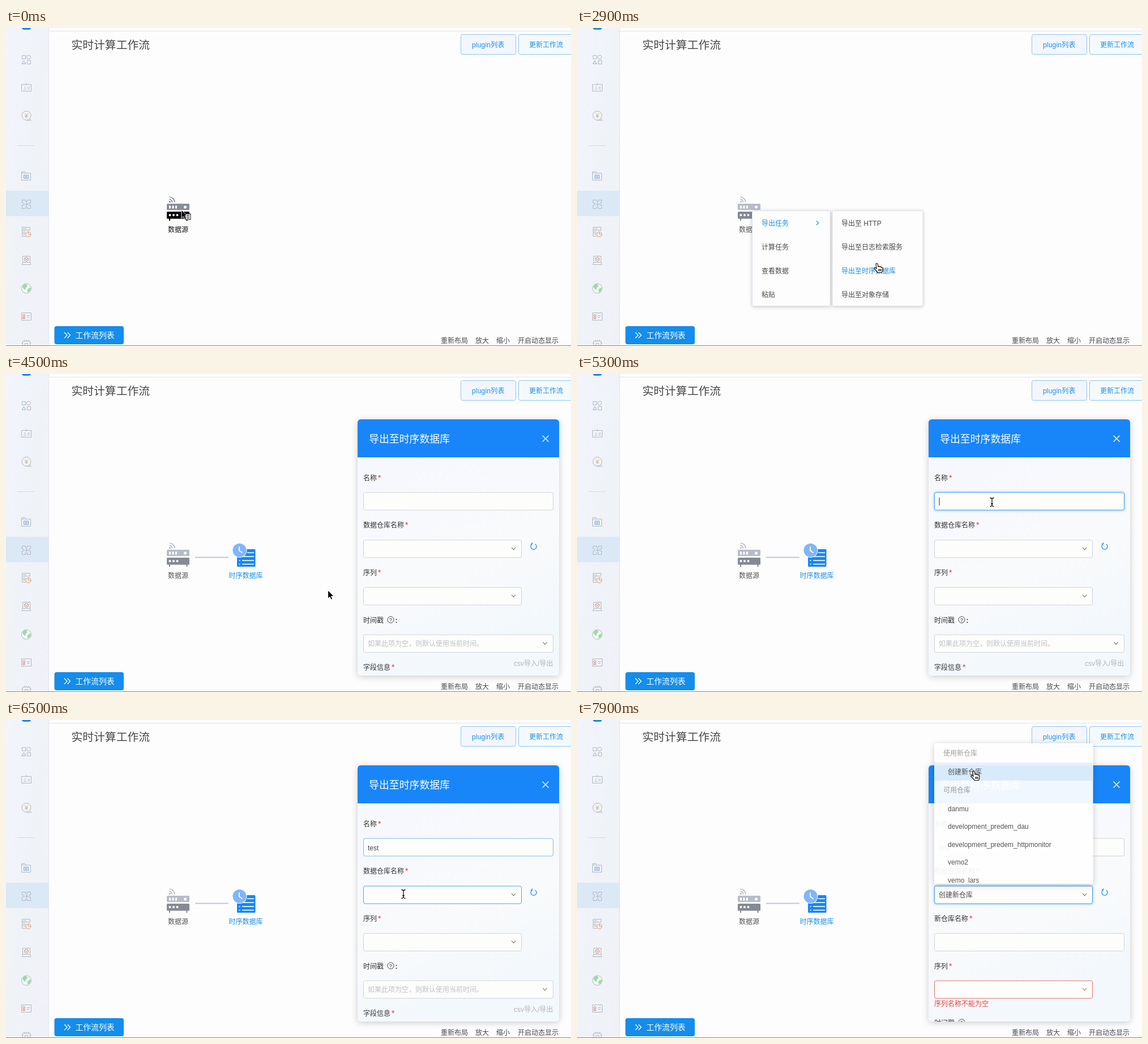
An HTML page that plays this animation: 998x561 px, repeating every 8000 ms.

```html
<!DOCTYPE html>
<html lang="zh">
<head>
<meta charset="utf-8">
<style>
html, body { margin: 0; width: 100%; height: 100%; overflow: hidden; background: #fdfdfe }
svg { display: block; font: 12px "Liberation Sans", "Noto Sans CJK SC", sans-serif; fill: #4a4a4c }
.line { fill: none; stroke: #b4b8c0; stroke-width: 1 }
.node { --top: #b7bcc8; --base: #858a95; --label: #555 }
.node.hover { --top: #888d98; --base: #000; --label: #111 }
.box { fill: #fdfdfc; stroke: #d0d3d8 }
.box.red { stroke: #e8706a }
.box.hover { stroke: #4ba5ee }
.box.soft { stroke: #7fbcf0 }
.box.focus { stroke: #40a0f0; filter: drop-shadow(0 0 2px #1890ff88) }
.menu { fill: #fdfdfe; stroke: #dfe1e8; filter: drop-shadow(0 1px 3px #0003) }
</style>
</head>
<body>
<svg id="stage" width="998" height="561" viewBox="0 0 998 561"></svg>
<script>
const BLUE = '#1886f8', LINK = '#1b8fe8';

// Text placed by its left edge and vertical centre.
const text = (x, cy, s, { size = 12, attr = '' } = {}) =>
  `<text x="${x}" y="${cy + size * .38}" font-size="${size}" ${attr}>${s}</text>`;
const label = (cy, s, star = true) =>
  text(631, cy, s + (star ? '<tspan fill="#e23c39" dx="2" font-size="14">*</tspan>' : ''),
    { attr: 'fill="#333" font-weight="500"' });
const box = (y, w, id = '', cls = '') =>
  `<rect ${id && `id="${id}"`} class="box ${cls}" x="631.5" y="${y + .5}" width="${w}" height="31" rx="3"/>`;
const stroke = (d, color, width = 1) =>
  `<path d="${d}" fill="none" stroke="${color}" stroke-width="${width}"/>`;
const arrow = (x, y, color = '#666') => stroke(`M${x - 3.5} ${y - 2}l3.5 4 3.5-4`, color, 1.1);
const rect = (x, y, w, h, fill, extra = '') =>
  `<rect x="${x}" y="${y}" width="${w}" height="${h}" fill="${fill}" ${extra}/>`;
const dot = (x, y, r, fill) => `<circle cx="${x}" cy="${y}" r="${r}" fill="${fill}"/>`;
const group = (id, body, attr = '') => `<g id="${id}" ${attr}>${body}</g>`;
const timestamp = cy => label(cy, '时间戳', false) +
  `<circle cx="679.5" cy="${cy - .5}" r="5.6" fill="none" stroke="#444"/>` +
  text(676.7, cy - .3, '?', { size: 9.5, attr: 'fill="#333"' }) +
  text(687.5, cy, ':', { attr: 'fill="#333" font-weight="700"' });

const sidebar = rect(0, 0, 75, 561, 'url(#side)') + rect(75, 0, 1, 561, '#e4e6ee') +
  rect(0, 287, 75, 45, '#dbe9f7') + rect(28, -10, 16, 13, BLUE, 'rx="4"') +
  rect(20, 207, 31, 1, '#d6dae2') + `<g class="line">
  <path d="M28.5 48.5h6v6h-6zM37.500 57.500h6v6h-6zM36.500 51.500a3.500 3.500 0 1 0 7 0a3.500 3.500 0 1 0-7 0"/>
  <path d="M31.500 57.500l3.500 5.500h-7z" stroke="#83b5e6"/>
  <path d="M27.500 99.500h17v12h-17zM36 97v4M31 108h5M33.500 103v3M38 104.500h4M38 107.500h4"/>
  <path d="M28 154.500a8 8 0 1 1 16 0a8 8 0 1 1-16 0M36 163h8.500l-2.500-3"/>
  <path d="M33 150.500l3 3.500 3-3.500M36 154v5M33.500 154.500h5M33.500 156.500h5" stroke="#d9b37c"/>
  <path d="M27.500 268.500v-15h6l2 2.500h8v12.500zM27.500 256h8"/>
  <path d="M31.500 259.500h8v6h-8zM33 261.500h5M33 263.500h5" stroke="#7fa9d8"/>
  <path d="M28.500 303.500h6q-1 3 1.500 3t1.500-3h6v5q-3-1-3 2t3 2v6h-6q1-3-1.500-3t-1.500 3h-6v-6q3 1 3-2t-3-2zM33 311h7M36.500 307.500v7"/>
  <path d="M28.500 351.500h14v5h-14zM28.500 356.500v5h7M28.500 361.500v6h7M30 354h6M30 359h4M30 364h4"/>
  <path d="M35 364a4.500 4.500 0 1 0 9 0a4.500 4.500 0 1 0-9 0M39.500 360v4h4" stroke="#e19a72"/>
  <path d="M29.500 402.500h13v11h-13zM28 417.500h16l-1.500-4h-13z"/>
  <path d="M32.500 408a3.500 3.500 0 1 0 7 0a3.500 3.500 0 1 0-7 0M33 406l3 3 3-3" stroke="#de8b75"/>
  <circle cx="36" cy="459.500" r="8.500" fill="#f4f7f7"/>
  <path d="M29 456q3-5 7-4l2 3-3 3-1 4-3-2zM38 461l4-3 2 1-2 6-4 1z" fill="#9bdba8" stroke="none"/>
  <path d="M27.500 502.500h17v13h-17zM37 507.500h5M37 510.500h4"/>
  <path d="M29.500 507.500a2 2 0 1 0 4 0a2 2 0 1 0-4 0M30 510v3l1.500-1 1.500 1v-3" stroke="#d9776c"/>
  <path d="M29.500 552.500h13v12h-13zM33.500 556.500h5v6h-5zM32.500 550v2M36 550v2M39.500 550v2M27 556h2M43 556h2"/></g>`;

const page = rect(76, 5, 922, 1, '#e4e4ea') +
  text(115.500, 29, '实时计算工作流', { size: 19.8, attr: 'fill="#484848"' }) +
  rect(803.5, 11.5, 97, 35, '#f4f6fd', 'rx="3" stroke="#8fc4f6"') +
  rect(905.5, 11.5, 110, 35, '#f4fafc', 'rx="3" stroke="#8fc4f6"') +
  text(823, 29, 'plugin列表', { attr: `fill="${LINK}" font-weight="500" letter-spacing=".2"` }) +
  text(924, 29, '更新工作流', { attr: `fill="${LINK}" font-weight="500"` }) +
  rect(85.5, 526, 122.500, 32, '#148dec', 'rx="4"') +
  stroke('M103 537l5 5-5 5M108.500 537l5 5-5 5', '#fff', 1.3) +
  text(122.500, 542, '工作流列表', { size: 13.8, attr: 'fill="#fff" font-weight="500"' }) +
  [[768, '重新布局'], [829, '放大'], [866, '缩小'], [904, '开启动态显示']]
    .map(([x, s]) => text(x, 551, s)).join('') +
  rect(0, 560, 998, 1, '#85878c');

const source = stroke('M288.500 302a6 6 0 0 1 5 5.500M288.500 298a10 10 0 0 1 9.500 9.500', 'var(--top)', 1.7) +
  dot(289.500, 306.500, 1.6, 'var(--top)') +
  rect(284, 310, 40, 11, 'var(--top)', 'rx="1.5"') + rect(284, 324, 40, 12.500, 'var(--base)', 'rx="1.5"') +
  rect(288, 336, 2, 4, 'var(--base)') + rect(318.500, 336, 2, 4, 'var(--base)') +
  [288, 293.500, 299].map(x => rect(x, 313.500, 3, 5, '#fff')).join('') + dot(316.500, 316, 2.5, '#fff') +
  [289.500, 296, 302.500].map(x => dot(x, 330, 2, '#fff')).join('') +
  text(304, 355, '数据源', { attr: 'text-anchor="middle" fill="var(--label)"' });

const database = rect(408, 309, 32.500, 31, BLUE, 'rx="1.5"') +
  rect(426, 314.500, 12, 1.6, '#fff') +
  [322, 329, 335.500].map(y => dot(412.500, y, 1.1, '#fff') + rect(417, y - .8, 21, 1.6, '#fff')).join('') +
  dot(412.500, 311, 13, '#fdfdfe') + dot(412.500, 311, 12, '#7fb6fb') +
  stroke('M412 304.500v7l5.500 4', '#fff', 1.8) +
  text(423.500, 355, '时序数据库', { attr: `text-anchor="middle" fill="${LINK}"` });

const ROWS = [344, 386, 428, 470];
const menu = '<rect class="menu" x="309.500" y="322.500" width="138" height="168" rx="2"/>' +
  ['导出任务', '计算任务', '查看数据', '粘贴']
    .map((s, i) => text(326, ROWS[i], s, { attr: i ? '' : 'id="first"' })).join('') +
  stroke('M423 340.500l3.500 3.500-3.500 3.500', LINK, 1.1);
const submenu = '<rect class="menu" x="451" y="322.500" width="160" height="168" rx="2"/>' +
  ['HTTP', '日志检索服务', '时序数据库', '对象存储'].map((s, i) =>
    text(467, ROWS[i], '导出至' + (i ? '' : ' ') + s, { attr: 'class="target"' })).join('');

const form = label(183, '名称') + box(208.5, 335, 'name') + text(639, 225, '', { attr: 'id="typed"' }) +
  rect(640, 218, 1, 14, '#222', 'id="caret"') +
  label(266.5, '数据仓库名称') + box(292.5, 279, 'repo') + arrow(896.5, 308) +
  group('picked', text(639, 308.5, '创建新仓库')) +
  stroke('M934.500 300a5 5 0 1 1-5 0M929.500 300v-2.800M929.500 300h-2.800', LINK, 1.3) +
  group('fieldsA', label(350, '序列') + box(376, 279) + arrow(896.5, 391.5) +
    timestamp(434) + box(459.5, 335) + arrow(952, 475) +
    text(639, 475.5, '如果此项为空，则默认使用当前时间。', { attr: 'fill="#bfc1c4"' }) +
    label(517.500, '字段信息') + text(897, 510.5, 'csv导入/导出', { attr: 'fill="#b3b4b8"' })) +
  group('fieldsB', label(350, '新仓库名称') + box(376, 335) +
    label(434, '序列') + box(459.5, 279, '', 'red') + arrow(896.5, 475, '#e05a55') +
    text(631, 500.5, '序列名称不能为空', { attr: 'fill="#e0453c"' }) + timestamp(534));

const panel = rect(621, 80, 356, 452, 'url(#body)', 'rx="6" filter="url(#shade)"') +
  `<path d="M621 147V86q0-6 6-6h344q6 0 6 6v61z" fill="${BLUE}"/>` +
  text(641, 114.500, '导出至时序数据库', { size: 17.9, attr: 'fill="#fff" font-weight="500"' }) +
  stroke('M947.500 108.500l11 11M958.500 108.500l-11 11', '#fff', 1.4) +
  `<g clip-path="url(#clip)">${group('form', form)}</g>` +
  group('loading', group('dots', [0, 1, 2, 3].map(i =>
      `<circle cx="7.4" r="3.4" fill="#65adf4" opacity="${[.95, .6, .65, .6][i]}" transform="rotate(${i * 90})"/>`).join('')) +
    text(769, 341, '数据加载中', { attr: `fill="${LINK}"` }));

const dropdown = rect(631, 41, 280.500, 248, '#fff', 'rx="3" filter="url(#shade)"') +
  rect(631, 75, 280.500, 32, '#e6f2fc') + '<g clip-path="url(#list)">' +
  text(647, 58.500, '使用新仓库', { attr: 'fill="#999"' }) + text(655, 91, '创建新仓库') +
  text(647, 123.500, '可用仓库', { attr: 'fill="#999"' }) +
  ['danmu', 'development_predem_dau', 'development_predem_httpmonitor', 'vemo2', 'vemo_lars']
    .map((s, i) => text(655, 156 + i * 31.6, s)).join('') + '</g>';

const pointer = 'M0 0V14.500L3.300 11.500 5.500 16.500 8 15.400 5.800 10.500H10.500Z';
const beam = 'M-3.500-7.500Q0-7.500 0-5V5Q0 7.500-3.500 7.500M3.500-7.500Q0-7.500 0-5V5Q0 7.500 3.500 7.500M-2 3H2';
const cursors = group('arrow', `<path d="${pointer}" stroke="#fff"/>` +
    group('badge', rect(7, 7, 9, 10, '#fff', 'stroke="#111"') +
      stroke('M9 9.500h5M9 12h5M9 14.500h5', '#111')), 'fill="#000"') +
  group('hand', `<path d="M-2 1.500C-2-.500 1-.500 1.200 1.500L2 6C3 5 4.700 5.300 4.900 6.500C6 5.700 7.300 6.200 7.400 7.300
    C8.800 6.800 9.800 7.500 9.800 9V12C9.800 13.500 9 14.500 8.500 16.500H1C0 14-3 11.500-5 9.500C-5.800 8.300-4 7-2.500 8.200L-1 9.500Z
    M3 10v4M5 10v4M7 10v4" fill="#fff" stroke="#111" stroke-width="1.200"/>`) +
  group('beam', stroke(beam, '#fff', 3) + stroke(beam, '#111', 1.3));

stage.innerHTML = `<defs>
  <linearGradient id="side" x2="1" y2="1"><stop stop-color="#f3f4fd"/><stop offset=".5" stop-color="#eff3f7"/><stop offset="1" stop-color="#f0f1f8"/></linearGradient>
  <linearGradient id="body" x2=".3" y2="1"><stop stop-color="#f6f7ff"/><stop offset=".65" stop-color="#f9fafb"/><stop offset="1" stop-color="#f3f8fc"/></linearGradient>
  <filter id="shade" x="-20%" y="-20%" width="140%" height="140%"><feDropShadow dx="0" dy="2" stdDeviation="6" flood-opacity=".2"/></filter>
  <clipPath id="clip"><rect x="621" y="147" width="356" height="385"/></clipPath>
  <clipPath id="list"><rect x="631" y="41" width="281" height="247.500"/></clipPath></defs>` +
  sidebar + page + '<path id="edge" stroke="#c3c8d1" stroke-width="2"/>' +
  group('source', source, 'class="node"') + group('database', database) +
  group('menu', menu) + group('submenu', submenu) + group('panel', panel) +
  group('dropdown', dropdown) + group('cursor', cursors);

const $ = id => document.getElementById(id);
const clamp = v => Math.min(1, Math.max(0, v));
const ease = v => v * v * (3 - 2 * v);
const ramp = (t, from, to) => ease(clamp((t - from) / (to - from)));
const show = (id, on) => {
  $(id).style.opacity = +on;
  $(id).style.visibility = on ? 'visible' : 'hidden';
};

// Pointer stops: time, x, y.
const STOPS = [[0, 310, 321], [800, 310, 321], [1300, 340, 345], [1600, 340, 345], [2200, 480, 350],
  [2800, 530, 415], [3200, 530, 415], [3400, 528, 420], [4300, 528, 420], [5000, 733, 226],
  [6050, 733, 226], [6400, 702, 307], [6900, 702, 307], [7500, 701, 90], [8000, 701, 90]];

function pointerAt(t) {
  const i = STOPS.findIndex(s => s[0] > t);
  const [t0, x0, y0] = STOPS[i - 1], [t1, x1, y1] = STOPS[i], k = ramp(t, t0, t1);
  return [x0 + (x1 - x0) * k, y0 + (y1 - y0) * k];
}

function draw(t) {
  const [x, y] = pointerAt(t), menuOpen = t >= 700 && t < 3300;
  const busy = t < 4500, created = t >= 7850;

  $('source').classList.toggle('hover', t < 700);
  show('menu', menuOpen);
  show('submenu', menuOpen && t >= 1200);
  $('first').style.fill = t >= 1000 ? LINK : '';
  document.querySelectorAll('.target').forEach((row, i) => {
    row.style.fill = x > 451 && Math.abs(y + 5 - ROWS[i]) < 21 ? LINK : '';
  });

  const grow = ramp(t, 3700, 4300);
  const start = 330 + 4 * grow, end = 340 + 53 * grow;
  $('edge').setAttribute('d', `M${start} 323.500H${t < 3900 ? 344 : Math.max(344, end)}`);
  show('edge', t >= 3700);
  show('database', ramp(t, 3900, 4300));

  show('panel', ramp(t, 3200, 3600));
  $('panel').setAttribute('transform', `translate(${40 * (1 - ramp(t, 3200, 3600))})`);
  $('form').style.filter = busy ? 'blur(2.5px)' : '';
  $('form').style.opacity = busy ? .22 : 1;
  show('loading', t >= 3300 && busy);
  $('dots').setAttribute('transform', `translate(799.5 316.5) rotate(${(t - 3800) * .3 - 62})`);

  const letters = Math.floor(clamp((t - 5400) / 500) * 4);
  const typing = t >= 5000 && t < 6400;
  $('typed').textContent = 'test'.slice(0, letters);
  $('caret').setAttribute('x', 639.5 + [0, 3.3, 10, 16, 19.3][letters]);
  show('caret', typing && (t < 5900 || t % 1000 < 500));
  $('name').setAttribute('class', 'box ' + (typing ? 'focus' : t >= 6400 && t < 6600 ? 'soft' : ''));
  $('repo').setAttribute('class', 'box ' + (t >= 6600 ? 'focus' : t >= 6400 ? 'hover' : ''));

  show('dropdown', t < 6700 ? 0 : created ? .94 : ramp(t, 6600, 6900));
  show('picked', created);
  show('fieldsA', !created);
  show('fieldsB', created);

  const kind = t < 1000 || t >= 3300 && t < 4900 ? 'arrow' : t >= 4900 && t < 7000 ? 'beam' : 'hand';
  ['arrow', 'hand', 'beam'].forEach(id => show(id, id === kind));
  show('badge', t < 700);
  $('cursor').setAttribute('transform', `translate(${x} ${y})`);
}

const began = performance.now();
(function tick() {
  const t = Math.max(0, performance.now() - began) % 8000;
  draw(Math.floor(t / 100) * 100);
  requestAnimationFrame(tick);
})();
</script>
</body>
</html>
```
